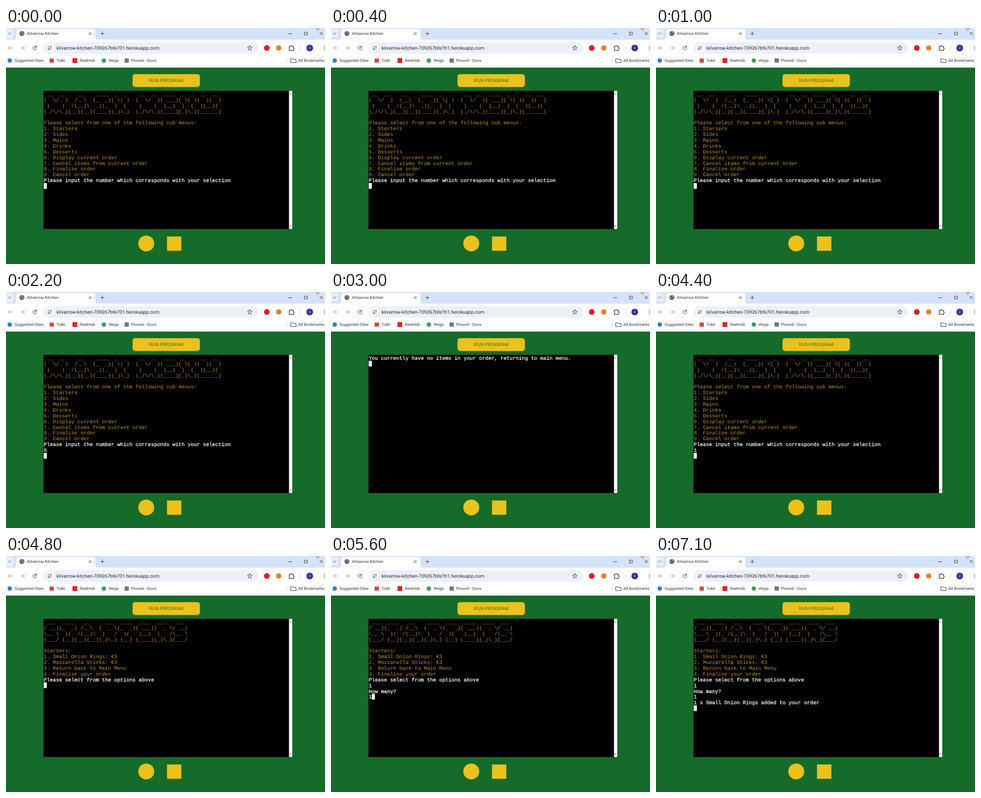
Animation of 600 by 446 pixels, one loop 8 s. Source, as an HTML page:

```html
<!DOCTYPE html>
<html lang="en">
<head>
<meta charset="utf-8">
<title>Terminal menu</title>
<style>
  html, body { margin: 0; width: 100%; height: 100%; overflow: hidden; background: #156b29; }
  #stage { position: absolute; left: 0; top: 0; width: 600px; height: 446px; overflow: hidden; }
  svg { position: absolute; left: 0; top: 0; }
  svg text { font: 7.6px Roboto, sans-serif; fill: #34363a; text-rendering: geometricPrecision; }
  svg .url { font-size: 9px; fill: #27292d; }
  svg .button { font: 8.54px "Liberation Sans", Arial, sans-serif; fill: #2b6a24; text-anchor: middle; }
  svg .initial { font-size: 6.5px; fill: #fff; text-anchor: middle; }
  .line { fill: none; stroke: #44474c; stroke-width: 1; stroke-linecap: round; stroke-linejoin: round; }
  .faint { stroke: #9a9ca1; }
  /* 80 x 24 cells of 9 x 17 px */
  #screen {
    position: absolute; left: 70.5px; top: 118.7px; margin: 0; width: 720px; height: 408px;
    overflow: hidden; color: #fff; transform: scale(.64); transform-origin: 0 0;
    font: 15px/17px "Liberation Mono", "Courier New", monospace; white-space: pre;
    text-rendering: geometricPrecision; font-variant-ligatures: none;
  }
  .amber, .white { position: relative; top: 1.6px; }
  .amber { color: #c0961e; }
  .white { -webkit-text-stroke: .4px #fff; }
  .cursor { display: inline-block; width: 9px; height: 17px; background: #fff; vertical-align: top; }
</style>
</head>
<body>
<div id="stage">
  <svg width="600" height="446" viewBox="0 0 600 446">
    <rect width="600" height="446" fill="#156b29"/>

    <!-- tab strip -->
    <rect width="600" height="24" fill="#d5e2fb"/>
    <rect x="-4" y="2" width="18" height="17" rx="5" fill="#e9f0fd"/>
    <path class="line" d="M4.5 9.2 7 11.7 9.5 9.2"/>
    <path d="M14 22Q19 22 19 17V7Q19 2 24 2H163Q168 2 168 7V17Q168 22 173 22Z" fill="#fff"/>
    <circle cx="30" cy="10.5" r="4.6" fill="#4a4d52"/>
    <path d="M27 8.5Q29 10 28.8 12.5M30.5 7Q30 9.5 33 10M31 14Q31.5 12 33.5 12" fill="none" stroke="#fff" stroke-width=".9"/>
    <text x="40" y="13.2">Kilvarrow Kitchen</text>
    <path class="line" d="M156.2 8.3l4.4 4.4M160.6 8.3l-4.4 4.4M178 10.5h6.4M181.2 7.3v6.4"/>
    <path class="line" d="M531.5 10.8h6.5M561.8 8h5v5h-5ZM590.5 8l5 5M595.5 8l-5 5" stroke-linecap="butt"/>
    <path d="M583 0 586 4.5 589 0Z" fill="#fff" stroke="#444" stroke-width=".8"/>

    <!-- toolbar -->
    <path d="M0 74.7V22H600V74.7Z" fill="#fff"/>
    <path class="line faint" d="M12 37.8H4.8M8 34.5 4.7 37.8 8 41.1"/>
    <path class="line faint" d="M27.5 37.8h7.2M31.5 34.5l3.3 3.3-3.3 3.3"/>
    <path class="line" d="M57.4 36A3.5 3.5 0 1 0 57.9 38.5M57.8 33.8V36.4H55.2"/>
    <rect x="71" y="27" width="403" height="21.5" rx="10.7" fill="#ecf0f9"/>
    <circle cx="82.2" cy="37.7" r="7.6" fill="#fff"/>
    <path class="line" d="M78.5 35.8h3M85.5 39.8h-3"/>
    <circle class="line" cx="84.4" cy="35.8" r="1.3"/>
    <circle class="line" cx="79.9" cy="39.8" r="1.3"/>
    <text class="url" x="95" y="41">kilvarrow-kitchen-709267bfe701.herokuapp.com</text>
    <path class="line" d="M458.5 33.2l1.3 2.9 3.1.3-2.4 2.1.7 3.1-2.7-1.6-2.7 1.6.7-3.1-2.4-2.1 3.1-.3Z"/>
    <circle cx="490.5" cy="37.7" r="5.4" fill="#dc2028"/>
    <circle cx="513" cy="37.7" r="5" fill="#e3812f"/>
    <path class="line" d="M532.6 34.8h2.5a1.5 1.5 0 0 1 3 0H540.8v2.5a1.5 1.5 0 0 1 0 3V42.4H532.6V40a1.5 1.5 0 0 0 0-2.8Z" style="stroke-width:1.3"/>
    <path d="M554.2 32.5v10.5" stroke="#c4d7f7"/>
    <circle cx="571.3" cy="37.8" r="6.3" fill="#302f93"/>
    <text class="initial" x="571.3" y="40.1">C</text>
    <path d="M598 34h1.5v1.5h-1.5ZM598 37h1.5v1.5h-1.5ZM598 40h1.5v1.5h-1.5Z" fill="#44474c"/>

    <!-- bookmarks -->
    <circle cx="7" cy="61.5" r="4" fill="#2083d8"/>
    <rect x="82" y="57.8" width="8" height="7.6" fill="#dc4438"/>
    <rect x="125" y="57" width="9" height="9" fill="#e52421"/>
    <circle cx="184" cy="61.5" r="4" fill="#34a153"/>
    <rect x="223" y="57.5" width="8" height="8" fill="#73767c"/>
    <text x="16" y="64.2">Suggested Sites</text>
    <text x="95" y="64.2">Tobli</text>
    <text x="139" y="64.2">ReelHob</text>
    <text x="193" y="64.2">Wegs</text>
    <text x="235" y="64.2">Plixorel - Docs</text>
    <path d="M528.5 56v11" stroke="#c4d7f7"/>
    <path class="line" d="M536 58h3.2l1.2 1.4H545.5V65.4H536Z"/>
    <text x="550" y="64.2">All Bookmarks</text>

    <!-- page -->
    <rect x="238" y="87.2" width="126.7" height="24.2" rx="4.8" fill="#ebc11b"/>
    <text class="button" x="301.3" y="102.3">RUN PROGRAM</text>
    <rect x="70.5" y="118.7" width="462" height="261.2"/>
    <rect x="532.3" y="118.7" width="6.1" height="261.2" fill="#f8f9f8"/>
    <path d="M533 125.2l1.7-2.2 1.7 2.2ZM533 373.5l1.7 2.2 1.7-2.2Z" fill="#777"/>
    <circle cx="263.8" cy="407.2" r="15" fill="#ebc11b"/>
    <rect x="302.8" y="394" width="27" height="27" fill="#ebc11b"/>
  </svg>
  <pre id="screen"></pre>
</div>
<script>
const LOOP = 8000;

const mainMenu = String.raw`
 __  __    __    ____  _  _    __  __  ____  _  _  __  __
(  \/  )  /__\  (_  _)( \( )  (  \/  )( ___)( \( )(  )(  )
 )    (  /(__)\  _)(_  )  (    )    (  )__)  )  (  )(__)(
(_/\/\_)(__)(__)(____)(_)\_)  (_/\/\_)(____)(_)\_)(______)

Please select from one of the following sub menus:
1. Starters
2. Sides
3. Mains
4. Drinks
5. Desserts
6. Display current order
7. Cancel items from current order
8. Finalise order
9. Cancel order
`.slice(1);

const starters = String.raw`
 ___  ____   __    ____  ____  ____  ____  ___
/ __)(_  _) /__\  (  _ \(_  _)( ___)(  _ \/ __)
\__ \  )(  /(__)\  )   /  )(   )__)  )   /\__ \
(___/ (__)(__)(__)(_)\_) (__) (____)(_)\_)(___/

Starters:
1. Small Onion Rings: €3
2. Mozzarella Sticks: €3
3. Return back to Main Menu
4. Finalise your order
`.slice(1);

const askNumber = "Please input the number which corresponds with your selection\n";
const askOption = "Please select from the options above\n";
const askCount = askOption + "1\nHow many?\n";
const emptyOrder = "You currently have no items in your order, returning to main menu.\n";

// [start ms, amber text, white text before the cursor]
const steps = [
  [0, mainMenu, askNumber],
  [1400, mainMenu, askNumber + "6\n"],
  [2400, "", emptyOrder],
  [3700, mainMenu, askNumber],
  [4400, mainMenu, askNumber + "1\n"],
  [4800, starters, askOption],
  [5200, starters, askCount],
  [5600, starters, askCount + "1"],
  [6000, starters, askCount + "1\n1 x Small Onion Rings added to your order\n"],
];

const screenEl = document.getElementById("screen");

function span(className, text) {
  const el = document.createElement("span");
  el.className = className;
  el.textContent = text;
  return el;
}

let shown = null;
function draw(time) {
  const step = steps.findLast(([start]) => start <= time);
  if (step === shown) return;
  shown = step;
  screenEl.replaceChildren(span("amber", step[1]), span("white", step[2]), span("cursor", ""));
}

const startTime = performance.now();
function tick() {
  draw((performance.now() - startTime) % LOOP);
  requestAnimationFrame(tick);
}
tick();
</script>
</body>
</html>
```
